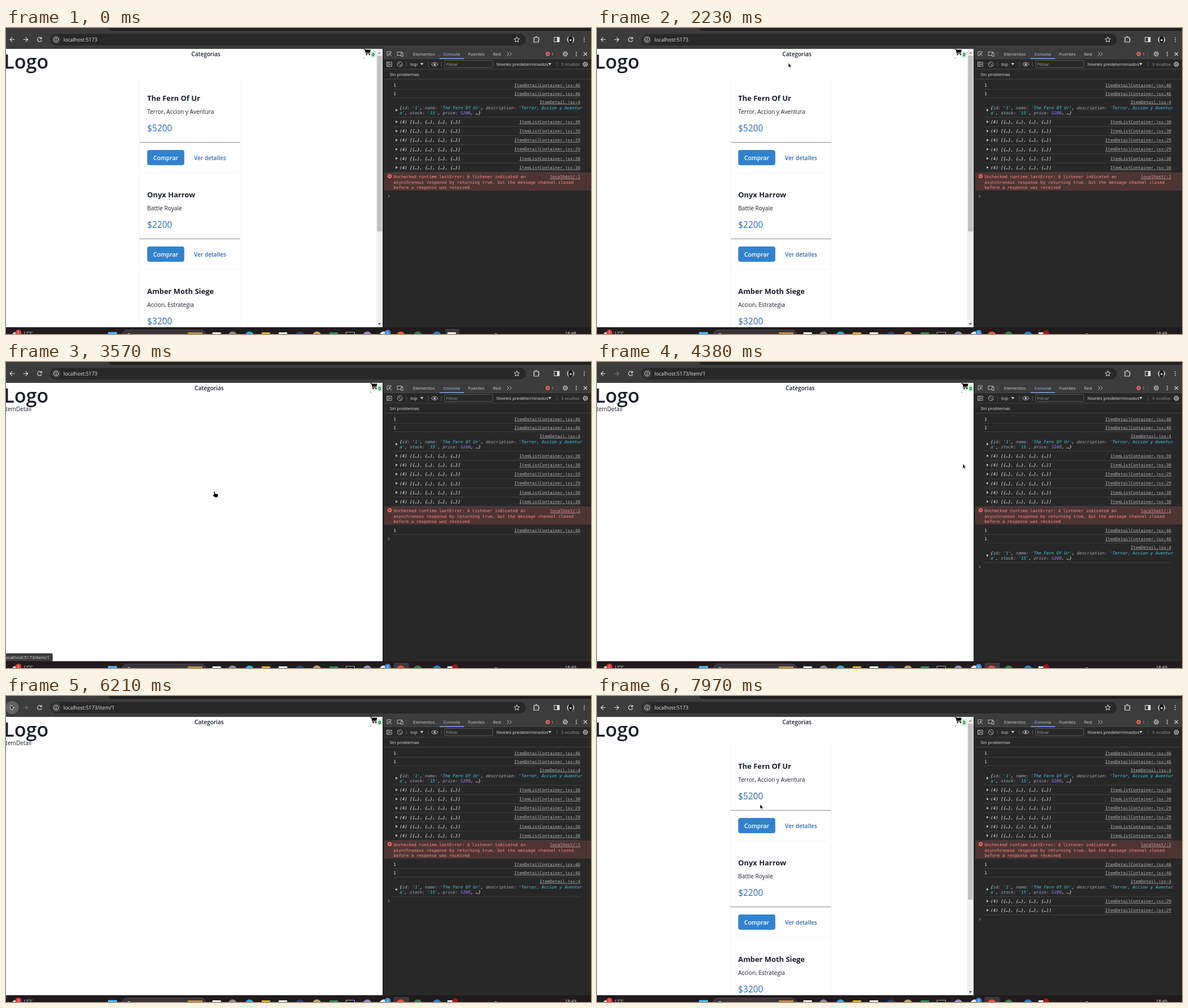
An HTML page that plays this animation: 1033 by 542 pixels, repeating every 8000 ms.

```html
<!DOCTYPE html>
<html lang="es">
<head>
<meta charset="utf-8">
<style>
html, body { margin: 0; width: 100%; height: 100%; overflow: hidden; background: #282828; }
svg { display: block; width: 1033px; height: 542px; }
text { white-space: pre; font-family: "Open Sans", "Noto Sans", sans-serif; }
.mono { font-family: "DejaVu Sans Mono", monospace; }
.link { text-decoration: underline; }
</style>
</head>
<body>
<svg id="stage" viewBox="0 0 1033 542"></svg>
<script>
const NS = 'http://www.w3.org/2000/svg';
const stage = document.getElementById('stage');
const LOOP = 8000;

function el(parent, tag, attrs = {}) {
  const n = document.createElementNS(NS, tag);
  for (const k in attrs) n.setAttribute(k, attrs[k]);
  parent.appendChild(n);
  return n;
}
const group = (p, x = 0, y = 0) => el(p, 'g', { transform: `translate(${x} ${y})` });
const rect = (p, x, y, width, height, fill, more) => el(p, 'rect', { x, y, width, height, fill, ...more });
const circle = (p, cx, cy, r, fill, more) => el(p, 'circle', { cx, cy, r, fill, ...more });
const line = (p, d, stroke, w = 1) =>
  el(p, 'path', { d, stroke, fill: 'none', 'stroke-width': w, 'stroke-linejoin': 'round' });
const shape = (p, d, fill, more) => el(p, 'path', { d, fill, ...more });
function text(p, x, y, str, size, fill, more) {
  const n = el(p, 'text', { x, y, 'font-size': size, fill, ...more });
  n.textContent = str;
  return n;
}
const show = (n, on) => n.setAttribute('visibility', on ? 'visible' : 'hidden');
const MID = { 'text-anchor': 'middle' };
const END = { 'text-anchor': 'end' };
const SEMI = { 'font-weight': 600 };
const INK = '#1a202c', BLUE = '#2b6cb0', PALE = '#e3e3e3';

// ---- page ----
rect(stage, 0, 37, 665, 493, '#fff');
text(stage, -3.8, 71.5, 'Logo', 34, INK, SEMI);
const menu = group(stage);
text(menu, 353, 50, 'Categorias', 10, INK, { ...MID, ...SEMI });
const cart = group(stage);
line(cart, 'M631.5 38H634L636 45.3H643', '#000', 1.1);
shape(cart, 'M634 38.6H644L642.6 43.8H635.6Z', '#000');
circle(cart, 636.8, 47.2, 1.1, '#000');
circle(cart, 641.8, 47.2, 1.1, '#000');
rect(cart, 632, 52.5, 1.2, 1.5, '#555');
rect(cart, 643.5, 41, 9.5, 11.5, '#c6f6d5', { rx: 1.3 });
text(cart, 648.3, 49.8, '0', 8, '#22543d', { ...MID, 'font-weight': 700 });

const detail = text(stage, 45, 87, 'ItemDetail', 10.1, INK, END);

const list = group(stage);
const hover = rect(list, 320.5, 216.5, 79, 26, '#ebf8ff', { rx: 4, stroke: '#646cff', 'stroke-width': 0.9 });
const links = [
  ['The Fern Of Ur', 'Terror, Accion y Aventura', '$5200'],
  ['Onyx Harrow', 'Battle Royale', '$2200'],
  ['Amber Moth Siege', 'Accion, Estrategia', '$3200']
].map(([name, kind, price], i) => {
  const card = group(list, 236, 86 + i * 171);
  line(card, 'M-.5 3V167Q-.5 171 4 171H173.5Q177.5 171 177.5 167V3', '#f4f4f4');
  text(card, 13.3, 42.9, name, 12.9, INK, { 'font-weight': 700 });
  text(card, 13.3, 66.4, kind, 10.15, INK);
  text(card, 13.3, 96.8, price, 15.4, BLUE);
  rect(card, 0, 116, 177.5, 1, '#8c8c8c');
  rect(card, 13.3, 130.1, 65.5, 26.8, '#3182ce', { rx: 4 });
  text(card, 46, 147.9, 'Comprar', 10.4, '#fff', { ...MID, ...SEMI });
  return text(card, 124.3, 147.9, 'Ver detalles', 10, BLUE, { ...MID, ...SEMI });
});
rect(list, 654, 37, 11, 493, '#f1f1f1');
rect(list, 655, 49, 9, 311.5, '#c1c1c1');
shape(list, 'M656.5 45.5L659.3 42.3L662 45.5Z', '#8a8a8a');
shape(list, 'M656.5 522.8L659.3 526L662 522.8Z', '#505050');

const status = group(stage);
rect(status, -4, 516, 86.5, 18, '#3c3c3c', { rx: 2.5 });
text(status, 77, 525.8, 'localhost:5173/item/1', 7.9, '#e0e0e0', END);

// ---- browser bar ----
rect(stage, 0, 0, 1033, 37, '#3c3c3c');
shape(stage, 'M181 0Q182 5 187 5H1033V0Z', '#1f2020');
const backHover = circle(stage, 11, 20.5, 11.5, '#636363');
line(stage, 'M15 20.5H7M11 16.7L7 20.5L11 24.3', PALE, 1.1);
const forward = line(stage, 'M30.5 20.5H38.5M34.6 16.7L38.5 20.5L34.6 24.3', PALE, 1.1);
line(stage, 'M62.3 18A3.8 3.8 0 1 0 63 21.5M63 16V18.9H60', PALE, 1.1);
rect(stage, 78, 10.5, 840, 20.5, '#282828', { rx: 10.2 });
circle(stage, 88.5, 20.5, 8, '#3c3c3c');
circle(stage, 88.5, 20.5, 4.2, 'none', { stroke: PALE });
line(stage, 'M88.5 20V22.8M88.5 18V19', PALE);
const address = text(stage, 101.5, 23.8, '', 8.9, '#e8e8e8');
line(stage, 'M902 15.7L903.4 18.9L906.8 19.2L904.2 21.5L905 24.9L902 23.1L899 24.9L899.8 21.5L897.2 19.2L900.6 18.9Z', PALE);
line(stage, 'M932 17H935V16Q936.3 14.3 937.6 16V17H940.5V19.6Q942.4 20.8 940.5 22V25H932V22Q934 20.8 932 19.6Z', PALE, 1.2);
rect(stage, 968, 16.5, 9, 8, 'none', { stroke: PALE });
rect(stage, 973, 16.5, 4, 8, PALE);
circle(stage, 997, 20.5, 6.3, '#d6d6d6');
el(stage, 'ellipse', { cx: 997, cy: 20.5, rx: 4.4, ry: 6.6, fill: '#151515' });
circle(stage, 997, 21.5, 1.8, '#d6d6d6');
const dots = (x, y, gap) => [-gap, 0, gap].forEach(d => circle(stage, x, y + d, 0.9, PALE));
dots(1021, 20.5, 3.4);

// ---- dev tools ----
const tools = group(stage);
rect(tools, 665, 37, 368, 493, '#282828');
rect(tools, 665, 37, 368, 18, '#3c3c3c');
rect(tools, 665, 37, 1.5, 493, '#1f2020');
['54.5', '73', '90.5'].forEach(y => line(tools, `M667 ${y}H1033`, '#4a4a4a', 0.8));
line(tools, 'M680 44V42H673V49H676M676.5 45L681 50M676.5 48.5V45H680', '#c7c7c7', 0.9);
rect(tools, 691, 42.5, 8, 6, 'none', { stroke: '#c7c7c7', 'stroke-width': 0.9 });
rect(tools, 697.5, 44.5, 3.5, 5.5, '#3c3c3c', { stroke: '#c7c7c7', 'stroke-width': 0.9 });
line(tools, 'M707 41V50', '#5e5e5e', 0.7);
const label = (x, y, s, fill = PALE, more) => text(tools, x, y, s, 7.8, fill, more);
label(738, 48.8, 'Elementos', '#d2d2d2', MID);
label(787, 48.8, 'Consola', '#a8c7fa', MID);
rect(tools, 765.5, 53.5, 43.5, 1.5, '#7cacf8');
label(830.5, 48.8, 'Fuentes', '#d2d2d2', MID);
label(867, 48.8, 'Red', '#d2d2d2', MID);
line(tools, 'M884.5 42.5L888 46L884.5 49.5M889 42.5L892.5 46L889 49.5', '#c7c7c7', 0.9);
const cross = (p, x, y) => {
  circle(p, x, y, 3.7, '#e46962');
  line(p, `M${x - 1.5} ${y - 1.5}l3 3m0 -3l-3 3`, '#282828', 0.9);
};
cross(tools, 956.5, 46);
label(963, 48.8, '1', '#f2908a');
line(tools, 'M973 41V51', '#5e5e5e', 0.7);
const gear = (x, y) => {
  circle(tools, x, y, 3.7, 'none', { stroke: '#c7c7c7', 'stroke-width': 1.6, 'stroke-dasharray': '1.9 1' });
  circle(tools, x, y, 2.9, 'none', { stroke: '#c7c7c7', 'stroke-width': 0.8 });
  circle(tools, x, y, 1.2, '#c7c7c7');
};
gear(987.5, 46);
dots(1007, 46, 3);
line(tools, 'M1020 43l6 6m0 -6l-6 6', '#d8d8d8', 1.1);
rect(tools, 672.5, 60.5, 8.5, 7.5, 'none', { stroke: '#c7c7c7', 'stroke-width': 0.9 });
line(tools, 'M675 60.5V68', '#c7c7c7', 0.9);
shape(tools, 'M677 62.3L679.5 64.2L677 66.1Z', '#c7c7c7');
circle(tools, 695.5, 64.2, 4.3, 'none', { stroke: '#c7c7c7', 'stroke-width': 0.9 });
line(tools, 'M692.5 61.2L698.5 67.2', '#c7c7c7', 0.9);
line(tools, 'M707 60V69M746 60V69M769 60V69M973 60V69', '#5e5e5e', 0.8);
label(714, 67, 'top');
shape(tools, 'M731.5 62H737L734.2 66Z', '#d0d0d0');
line(tools, 'M751 64.2Q757 57.5 763 64.2Q757 70.8 751 64.2Z', '#c7c7c7', 0.9);
circle(tools, 757, 64.2, 1.8, '#c7c7c7');
rect(tools, 774.5, 57.5, 85, 12.5, '#282828', { rx: 1.5, stroke: '#5e5e5e', 'stroke-width': 0.9 });
label(777, 67, 'Filtrar', '#a0a0a0');
label(866, 67, 'Niveles predeterminados');
shape(tools, 'M957.5 62H963L960.2 66Z', '#d0d0d0');
label(980, 67, '3 ocultos', '#9a9a9a');
gear(1023, 64.2);
label(677.5, 85, 'Sin problemas');

// ---- console rows ----
const SIZE = 7.44;
const LIGHT = '#f4f4f4';
const mono = (p, x, y, s, fill, more) => text(p, x, y, s, SIZE, fill, { class: 'mono', ...more });
const link = (p, y, s) => mono(p, 1014, y + 2.6, s, '#b0b0b0', { class: 'mono link', ...END });
const rule = (p, y) => line(p, `M684 ${y}H1014`, '#444', 0.8);
const marker = (p, y) => shape(p, `M688 ${y - 2.4}L691.6 ${y}L688 ${y + 2.4}Z`, '#c7c7c7');
const ITALIC = { 'font-style': 'italic' };

function countRow(y) {
  const g = group(tools);
  mono(g, 684.3, y + 2.7, '1', LIGHT);
  link(g, y, 'ItemDetailContainer.jsx:46');
  rule(g, y + 7.5);
  return g;
}
function arrayRow(y, src) {
  const g = group(tools);
  marker(g, y);
  mono(g, 695, y + 2.8, '(4) [{…}, {…}, {…}, {…}]', LIGHT, ITALIC);
  link(g, y, src);
  rule(g, y + 8.2);
  return g;
}
function rich(p, x, y, parts) {
  const t = mono(p, x, y, '', LIGHT, ITALIC);
  const tone = { k: '#9fa8b3', s: '#40cfe6', n: '#9980ff', w: LIGHT };
  parts.forEach(([c, s]) => { el(t, 'tspan', { fill: tone[c] }).textContent = s; });
}
function objectRow(y) {
  const g = group(tools);
  link(g, y, 'ItemDetail.jsx:4');
  marker(g, y + 14.5);
  rich(g, 695, y + 12.6, [['w', '{'], ['k', 'id: '], ['s', "'1'"], ['w', ', '], ['k', 'name: '],
    ['s', "'The Fern Of Ur'"], ['w', ', '], ['k', 'description: '], ['s', "'Terror, Accion y Aventur"]]);
  rich(g, 695, y + 22.2, [['s', "a'"], ['w', ', '], ['k', 'stock: '], ['s', "'15'"], ['w', ', '],
    ['k', 'price: '], ['n', '5200'], ['w', ', …}']]);
  rule(g, y + 27);
  return g;
}
countRow(101);
countRow(116);
objectRow(131);
[30, 30, 29, 29, 30, 30].forEach((n, i) =>
  arrayRow(166.2 + i * 16.2, (n === 29 ? 'ItemDetailContainer' : 'ItemListContainer') + '.jsx:' + n));
rect(tools, 668, 256, 365, 32, '#4e3534');
cross(tools, 677.5, 262.5);
['Unchecked runtime.lastError: A listener indicated an',
 'asynchronous response by returning true, but the message channel closed',
 'before a response was received'].forEach((s, i) => mono(tools, 684.3, 266 + i * 9.7, s, '#fb8d84'));
link(tools, 263.5, 'localhost/:1').setAttribute('fill', '#d0a5a2');

const late = [
  [3490, countRow(298)],
  [3670, countRow(313.2)],
  [3670, objectRow(328.2)],
  [6620, arrayRow(363.3, 'ItemDetailContainer.jsx:29')],
  [6620, arrayRow(379.3, 'ItemDetailContainer.jsx:29')]
];
const prompt = line(tools, 'M674.5 -2.5L677 0L674.5 2.5', '#7cacf8', 1);

// ---- task bar ----
const bar = group(stage);
rect(bar, 0, 530, 1033, 12, '#211b1d');
circle(bar, 16, 543, 4.5, '#c9ced6');
circle(bar, 22, 539.5, 5.2, '#d83b3b');
text(bar, 22, 542.3, '1', 7.5, '#fff', MID);
text(bar, 30.5, 543.2, '17°C', 7.8, '#f0f0f0');
rect(bar, 180, 538.5, 16, 8, '#4cb8f0');
rect(bar, 205, 535, 148, 20, '#3b3538', { rx: 9, stroke: '#5a5356', 'stroke-width': 0.8 });
circle(bar, 217, 543.5, 2.5, 'none', { stroke: '#ddd' });
rect(bar, 321, 539, 26, 4, '#b98a4a');
const recentTab = rect(bar, 775.5, 533, 25, 12, '#40393c', { rx: 2 });
const activeTab = rect(bar, 684.5, 533, 27, 12, '#40393c', { rx: 2 });
[[372, '#f4f4f4', 1], [400, '#8d8d94'], [430, '#2bb5c9'], [459, '#e2a93b', 1], [489, '#e5efe9', 1],
 [519, '#24466f'], [549, '#c9a46a'], [579, '#2d8a57', 1], [608, '#0c0c0c', 1], [638, '#8d93c7'],
 [667, '#ececec'], [697, '#e0533d'], [727, '#3b7a4f'], [761, '#2f80c4'], [787, '#f4f4f4', 1]
].forEach(([x, fill, square]) => square
  ? rect(bar, x - 7.5, 539, 15, 8, fill, { stroke: x === 608 ? '#bbb' : 'none' })
  : circle(bar, x, 545, 7.5, fill));
circle(bar, 674, 539.8, 5.2, '#3f8fd6');
text(bar, 674, 542.5, '1', 7.5, '#fff', MID);
const recording = circle(bar, 793, 540.5, 5, '#a3161c');
circle(bar, 865, 543.5, 2.6, '#d0d0d0');
const clock = text(bar, 1007, 543, '', 7.8, '#f0f0f0', END);

// ---- pointer ----
const pointer = group(stage);
const OUTLINE = { stroke: '#fff', 'stroke-width': 0.6 };
const arrow = shape(pointer, 'M0 0V8L1.9 6.3L3.1 9L4.4 8.4L3.2 5.8H5.7Z', '#000', OUTLINE);
const hand = shape(pointer,
  'M-1 .8Q0 -.7 1 .8V4L5.5 4.8Q6.8 5.2 6.5 6.8L5.8 10.8H.4L-2.8 6.8Q-3 5.4 -1 6.2Z', '#000', OUTLINE);

// Bursts of movement: start, end, number of steps.
const bursts = [[70, 830, 10], [890, 1470, 9], [1610, 2230, 10], [2420, 3130, 11], [3260, 3400, 2],
  [3900, 4640, 12], [4710, 5450, 11], [5520, 6210, 11], [7350, 7970, 10]];
// Pointer path: time, x, y.
const path = [[0, 986, 550], [70, 984, 538], [450, 860, 450], [830, 728, 367], [1000, 560, 305],
  [1250, 370, 218], [1470, 362, 226], [1610, 360, 216], [1900, 295, 130], [2230, 338, 62],
  [2420, 340, 46], [2650, 352, 120], [2910, 367, 236], [3130, 365, 231], [3260, 366, 229],
  [3400, 368, 229], [3900, 380, 226], [4640, 798, 155], [4710, 812, 170], [4900, 866, 258],
  [5300, 326, 150], [5450, 332, 133], [5520, 340, 134], [5590, 353, 133], [6210, 8, 16],
  [7210, 8, 16], [7350, 16, 20], [7970, 288, 192]];

function stepTime(t) {
  let held = 0;
  for (const [a, b, n] of bursts) {
    if (t < a) break;
    const gap = (b - a) / (n - 1);
    held = Math.min(b, a + Math.floor((t - a) / gap + 1e-6) * gap);
  }
  return held;
}
function pointerAt(t) {
  const s = stepTime(t);
  const i = Math.max(1, path.findIndex(p => p[0] >= s));
  const [a, b] = [path[i - 1], path[i]];
  const k = (s - a[0]) / (b[0] - a[0]);
  return [a[1] + (b[1] - a[1]) * k, a[2] + (b[2] - a[2]) * k];
}

function draw(t) {
  const [x, y] = pointerAt(t);
  const onList = t < 3490 || t >= 7140;
  const onItem = t >= 3670 && t < 6480;
  const overLink = t < 3900 && x >= 320 && x <= 400 && y >= 216 && y <= 243;

  show(list, onList);
  show(detail, t >= 3490 && t < 6480);
  menu.setAttribute('transform', `translate(${onList ? 0 : 5.7} 0)`);
  cart.setAttribute('transform', `translate(${onList ? 0 : 11.5} 0)`);
  show(hover, onList && overLink);
  links[0].setAttribute('fill', overLink && t > 2400 ? '#535bf2' : BLUE);
  show(status, t >= 2910 && t < 4100);

  address.textContent = 'localhost:5173' + (onItem ? '/item/1' : '');
  forward.setAttribute('stroke', onItem ? '#777' : PALE);
  show(backHover, Math.hypot(x - 11, y - 20.5) < 11.5 && t < 7350);

  late.forEach(([from, row]) => show(row, t >= from));
  const promptY = t < 3490 ? 298 : t < 3670 ? 313 : t < 6620 ? 363 : 395.3;
  prompt.setAttribute('transform', `translate(0 ${promptY})`);

  show(recentTab, t < 450);
  show(recording, t >= 450);
  show(activeTab, t >= 3400);
  clock.textContent = t < 2700 ? '18:48' : '18:49';

  pointer.setAttribute('transform', `translate(${x} ${y})`);
  show(hand, overLink);
  show(arrow, !overLink);
}

const start = performance.now();
function tick() {
  draw((performance.now() - start) % LOOP);
  requestAnimationFrame(tick);
}
tick();
</script>
</body>
</html>
```
